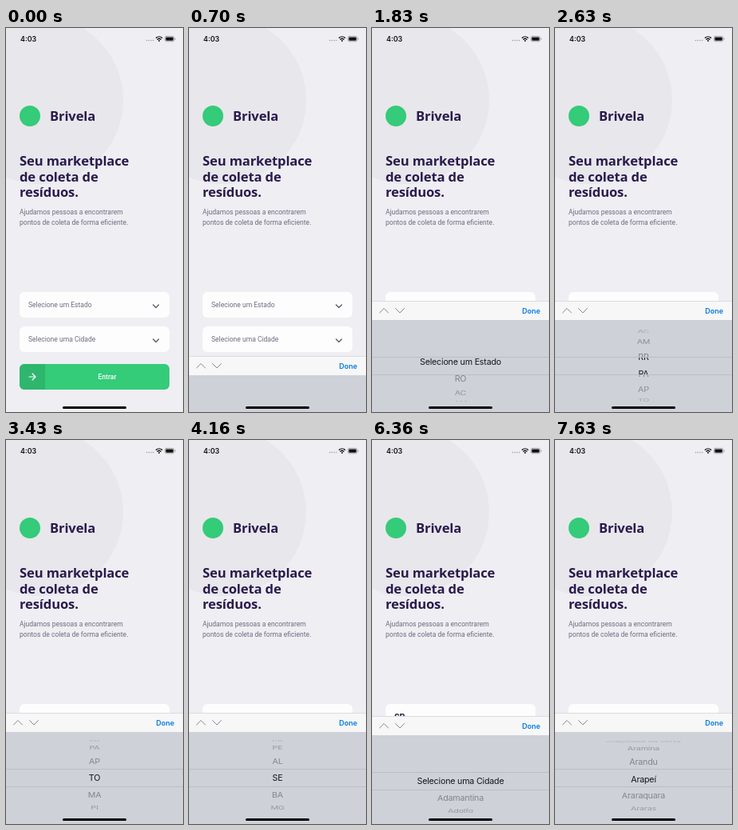
Animation, 222 px wide and 480 px high, one loop 8 s. Source, as an HTML page:

```html
<!DOCTYPE html>
<html lang="pt">
<head>
<meta charset="utf-8">
<title>Coleta</title>
<style>
  * { box-sizing: border-box; }
  html, body { margin: 0; width: 100%; height: 100%; overflow: hidden; }
  #stage {
    position: relative; width: 222px; height: 480px; overflow: hidden;
    background: #efeef3; font: 8.54px/13px Roboto, sans-serif; color: #6c6c80;
  }
  #stage div, svg { position: absolute; }
  .halo { left: -63px; top: -15px; width: 210px; height: 210px; border-radius: 50%; background: #e8e7ec; }
  .mark { left: 17px; top: 97px; width: 26px; height: 26px; border-radius: 50%; background: #34cb79; }
  .title {
    left: 17px; white-space: nowrap; color: #2a1a4c;
    font: 700 16.6px/19.5px "Noto Sans", sans-serif; letter-spacing: -.13px;
  }
  .intro { left: 17px; top: 224px; white-space: nowrap; }
  .field, .button { left: 17px; width: 188px; height: 32px; border-radius: 6px; line-height: 32px; }
  .field { padding-left: 11px; background: #fdfdfe; }
  .field.filled { color: #2a1a4c; font-size: 10.6px; font-weight: 700; line-height: 34px; }
  .button {
    top: 420px; padding-left: 32px; overflow: hidden; text-align: center;
    background: #34cb79; color: #fff; font-weight: 500;
  }
  .button div { left: 0; top: 0; width: 32px; height: 32px; background: #2fb66d; }
  .clock { left: 18px; top: 8px; font: 600 8.9px/12px Inter, sans-serif; color: #111; }
  .home { left: 71px; top: 473px; width: 80px; height: 3px; border-radius: 2px; background: #000; }

  .sheet { left: 0; top: var(--dock); width: 222px; height: 140px; background: #ced2d8; }
  .bar { left: 0; top: 0; width: 222px; height: 24px; background: #f7f7f8; border-top: 1px solid #dcdce0; }
  .done { right: 11px; top: 5px; font: 600 9px/13px Inter, sans-serif; color: #067ae0; }
  .picker { left: 0; top: 24px; width: 222px; height: max(0px, calc(443px - var(--dock))); overflow: hidden; }
  .band {
    left: 0; top: 46px; width: 222px; height: 23px; overflow: hidden;
    background: #ced2d8; border: solid #bbbec4; border-width: 1px 0;
  }
  .rows { left: 0; top: 58px; width: 222px; color: #7b7e84; }
  .band .rows { top: 11px; color: #15161a; }
  .rows div {
    left: 0; top: -10px; width: 222px; height: 20px; text-align: center; white-space: nowrap;
    font: 10.7px/20px Inter, sans-serif; letter-spacing: -.2px;
  }
</style>
</head>
<body>
<div id="stage">
  <div class="halo"></div>
  <div class="mark"></div>
  <div class="title" style="left:55px;top:100px">Brivela</div>
  <div class="title" style="top:156px">Seu marketplace<br>de coleta de<br>resíduos.</div>
  <div class="intro">Ajudamos pessoas a encontrarem<br>pontos de coleta de forma eficiente.</div>
  <div class="field" id="state" style="top:330px"></div>
  <div class="field" style="top:373px">Selecione uma Cidade</div>
  <div class="button"><div></div>Entrar</div>
  <svg width="222" height="480" fill="none" stroke-linecap="round" stroke-linejoin="round">
    <path d="M184.5 346l3.5 3.5 3.5-3.5M184.5 389l3.5 3.5 3.5-3.5" stroke="#55555f" stroke-width="1.2"/>
    <path d="M29 436h8m-4-4l4 4-4 4" stroke="#fff" stroke-width="1.1"/>
    <path d="M176.5 15.5h9" stroke="#999" stroke-width="1.4" stroke-dasharray=".1 2.6"/>
    <path d="M188.4 12.3a5.2 5.2 0 0 1 7.2 0M190 14.2a3 3 0 0 1 4 0" stroke="#111" stroke-width="1.4"/>
    <circle cx="192" cy="16" r="1" fill="#111"/>
    <rect x="199.4" y="10.4" width="11.4" height="6.4" rx="1.8" stroke="#888" stroke-width=".7"/>
    <rect x="200.4" y="11.4" width="9.4" height="4.4" rx="1" fill="#111"/>
    <path d="M212 12.8v1.6" stroke="#888" stroke-width=".8"/>
  </svg>
  <div class="clock">4:03</div>

  <div class="sheet" id="sheet">
    <div class="bar">
      <svg width="60" height="24" fill="none" stroke="#85878c" stroke-width="1" stroke-linecap="round" stroke-linejoin="round">
        <path d="M9.5 14l5.5-5.5 5.5 5.5M29.5 8.5l5.5 5.5 5.5-5.5"/>
      </svg>
      <div class="done">Done</div>
    </div>
    <div class="picker">
      <div class="rows"></div>
      <div class="band"><div class="rows"></div></div>
    </div>
  </div>
  <div class="home"></div>
</div>

<script>
  const LOOP = 8000, CITY_AT = 6360, CHOSEN_AT = 5500;
  const RADIUS = 47, STEP = 26.4 * Math.PI / 180, REACH = 3;

  const states = ["Selecione um Estado",
    ..."RO AC AM RR PA AP TO MA PI CE RN PB PE AL SE BA MG ES RJ SP PR SC RS MS MT GO DF".split(" ")];
  const cities = ("Selecione uma Cidade,Adamantina,Adolfo,Aguaí,Águas da Prata,Águas de Lindóia," +
    "Águas de Santa Bárbara,Águas de São Pedro,Agudos,Alambari,Alfredo Marcondes,Altair,Altinópolis," +
    "Alto Alegre,Alumínio,Álvares Florence,Álvares Machado,Álvaro de Carvalho,Alvinlândia,Americana," +
    "Américo Brasiliense,Américo de Campos,Amparo,Analândia,Andradina,Angatuba,Anhembi,Anhumas," +
    "Aparecida,Aparecida d'Oeste,Apiaí,Araçariguama,Araçatuba,Araçoiaba da Serra,Aramina,Arandu," +
    "Arapeí,Araraquara,Araras,Arco-Íris").split(",");

  // [time, top of the sheet]
  const dockKeys = [[0, 480], [500, 472], [570, 456], [630, 435], [700, 410], [760, 375], [830, 345],
    [1830, 341], [CITY_AT, 345], [7360, 341]];
  // [time, wheel position in rows]
  const wheelKeys = [[0, 0], [1830, .23], [1900, .9], [1960, 1.5], [2030, 1.85], [2100, 2], [2430, 2.3],
    [2630, 4.53], [2700, 5.3], [2760, 5.8], [2830, 6], [3230, 6.2], [3430, 7],
    [3700, 9], [3760, 11.2], [3830, 13], [3900, 14.2], [3960, 14.8], [4160, 15],
    [4360, 15.6], [4430, 17], [4500, 18.2], [4560, 18.8], [4630, 19], [5430, 19.6], [CHOSEN_AT, 20],
    [CITY_AT, 0], [7360, 1.5], [7430, 13], [7500, 25], [7560, 32.5], [7630, 35.93]];

  const held = (keys, t) => keys.filter(k => k[0] <= t).pop()[1];

  const sheet = document.getElementById("sheet");
  const stateField = document.getElementById("state");
  const wheels = [...document.querySelectorAll(".rows")].map(box =>
    Array.from({ length: 2 * REACH + 1 }, () => box.appendChild(document.createElement("div"))));

  function turn(rows, list, pos) {
    rows.forEach((row, k) => {
      const i = Math.round(pos) - REACH + k;
      const angle = (i - pos) * STEP;
      const depth = Math.max(0, Math.cos(angle));
      row.textContent = list[i] || "";
      row.style.transform = `translateY(${RADIUS * Math.sin(angle)}px) scaleY(${depth})`;
      row.style.opacity = .2 + .8 * depth;
    });
  }

  function draw(t) {
    const list = t < CITY_AT ? states : cities;
    const chosen = t >= CHOSEN_AT;
    sheet.style.setProperty("--dock", held(dockKeys, t) + "px");
    stateField.textContent = chosen ? "SP" : states[0];
    stateField.classList.toggle("filled", chosen);
    wheels.forEach(rows => turn(rows, list, held(wheelKeys, t)));
  }

  const start = performance.now();
  function tick() {
    draw((performance.now() - start) % LOOP);
    requestAnimationFrame(tick);
  }
  tick();
</script>
</body>
</html>
```
